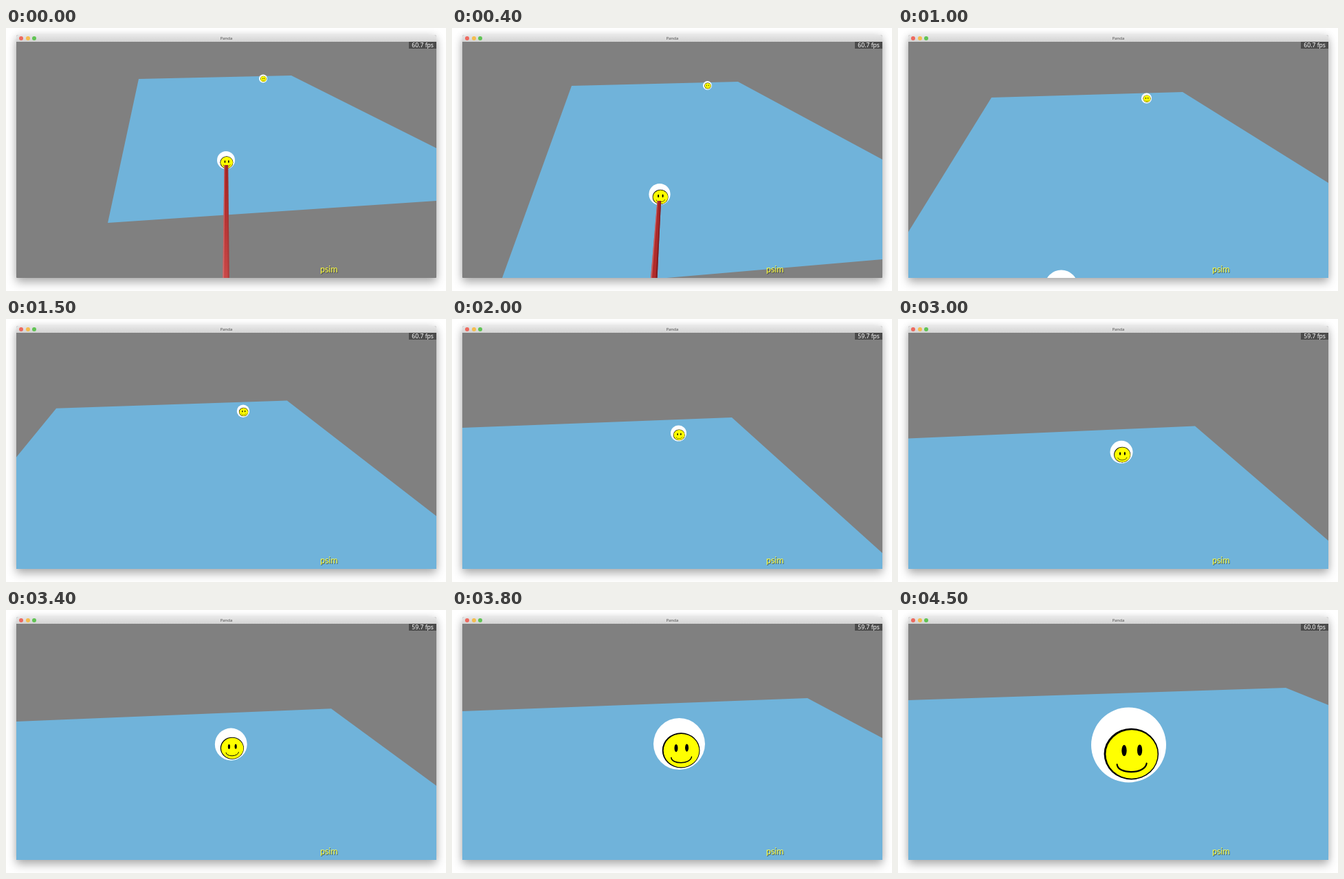
An HTML page with a canvas that plays this animation: 640 px wide and 382 px high, repeating every 4.6 s.

```html
<!DOCTYPE html>
<html lang="en">
<head>
<meta charset="utf-8">
<title>Panda</title>
<style>
  html, body { margin: 0; width: 100%; height: 100%; overflow: hidden; background: #fff; }
  #stage { position: relative; width: 640px; height: 382px; overflow: hidden; }
  #stage > * { position: absolute; }
  #win {
    left: 15px; top: 10px; width: 611px; height: 353px; background: #808080;
    border-radius: 3px 3px 1px 1px;
    box-shadow: 0 0 12px rgba(0,0,0,.12), 0 7px 14px rgba(0,0,0,.28);
  }
  #bar {
    left: 15px; top: 10px; width: 611px; height: 10px; border-radius: 3px 3px 0 0;
    background: linear-gradient(#e8e8e8, #d3d3d3);
    font: 6px/11px "Open Sans", sans-serif; color: #444; text-align: center;
  }
  .dot { top: 12px; width: 6px; height: 6px; border-radius: 50%; }
  #view { left: 0; top: 0; }
  #fps {
    right: 14px; top: 20px; height: 10px; padding: 0 4px; background: #4b4b4b;
    font: 8.6px/10px "Noto Sans", sans-serif; color: #fff; white-space: pre;
  }
  #label {
    left: 457px; top: 342px; font: 12.4px/18px Lato, sans-serif; color: #ffff40;
    text-shadow: .7px .7px 0 rgba(40,50,40,.75);
  }
</style>
</head>
<body>
<div id="stage">
  <div id="win"></div>
  <canvas id="view" width="640" height="382"></canvas>
  <div id="bar">Panda</div>
  <div class="dot" style="left:19px;background:#ee6a5f"></div>
  <div class="dot" style="left:28.5px;background:#f5bd4f"></div>
  <div class="dot" style="left:38px;background:#61c454"></div>
  <div id="fps"></div>
  <div id="label">psim</div>
</div>
<script>
const LOOP = 4600, STEP = 100;
const LEFT = 15, RIGHT = 626, TOP = 20, BOTTOM = 363;
const ctx = document.getElementById('view').getContext('2d');
const fps = document.getElementById('fps');

const allTimes = [0, 400, 1000, 2000, 3000, 3800, 4500];
const earlyTimes = [0, 400, 1000, 1400];

// Smooth curve through (times, values), with parabolic tangents.
function curve(values, times = allTimes) {
  const n = values.length, d = [], m = [];
  const h = i => times[i + 1] - times[i];
  for (let i = 0; i < n - 1; i++) d[i] = (values[i + 1] - values[i]) / h(i);
  for (let i = 1; i < n - 1; i++) m[i] = (d[i - 1] * h(i) + d[i] * h(i - 1)) / (h(i - 1) + h(i));
  m[0] = 2 * d[0] - m[1];
  m[n - 1] = 2 * d[n - 2] - m[n - 2];
  return t => {
    let i = 0;
    while (i < n - 2 && t > times[i + 1]) i++;
    const u = (t - times[i]) / h(i), v = 1 - u;
    return values[i] * (1 + 2 * u) * v * v + values[i + 1] * u * u * (3 - 2 * u)
      + h(i) * (m[i] * u * v * v - m[i + 1] * u * u * v);
  };
}

// Apparent size follows the inverse of distance.
function sizeCurve(radii, times) {
  const inverse = curve(radii.map(r => 1 / r), times);
  return t => 1 / inverse(t);
}

const table = {
  x: curve([415, 416, 414, 407, 432, 517, 564]),
  y: curve([69, 78, 93, 143, 155.5, 128, 113]),
  slope: curve([-.0225, -.0248, -.0288, -.0383, -.0432, -.0378, -.0328]),
  rightY: curve([174.5, 191, 225, 340, 322, 186, 138]),
  farX: curve([193, 174, 136, -18], [0, 400, 1000, 2000]),
  lean: curve([.215, .362, .62, 1], [0, 400, 1000, 2000]),
  nearY: curve([251, 336, 640, 1000], earlyTimes),
  nearSlope: curve([-.067, -.086, -.11, -.12], earlyTimes)
};

const farBall = {
  x: curve([374, 371.5, 361.5, 329.5, 325, 330.5, 335.5]),
  y: curve([73.5, 83.5, 102, 166, 193.3, 194.5, 196]),
  r: sizeCurve([6, 6.5, 7.6, 11.5, 16.5, 37.5, 54.5]),
  drop: curve([.06, .08, .08, .21, .23, .25, .24])
};

const nearBall = {
  x: curve([320, 302, 237.5, 160], earlyTimes),
  y: curve([192, 241.5, 375.5, 520], earlyTimes),
  r: sizeCurve([13, 15.6, 24, 34], earlyTimes),
  drop: () => .25
};

const stick = {
  tipX: curve([320.3, 301.3, 237, 160], earlyTimes),
  tipDrop: curve([7, 9.5, 14, 18], earlyTimes),
  footX: curve([320, 293.8, 232, 150], earlyTimes)
};

function fillPath(points, fill) {
  ctx.beginPath();
  points.forEach(([x, y]) => ctx.lineTo(x, y));
  ctx.closePath();
  ctx.fillStyle = fill;
  ctx.fill();
}

function ellipse(x, y, rx, ry, fill) {
  ctx.beginPath();
  ctx.ellipse(x, y, rx, ry, 0, 0, Math.PI * 2);
  ctx.fillStyle = fill;
  ctx.fill();
}

function drawTable(t) {
  const x = table.x(t), y = table.y(t), slope = table.slope(t);
  const early = t < 2000;
  const farX = early ? table.farX(t) : -200;
  const farY = y + slope * (farX - x);
  const near = t <= 1000 ? table.nearY(t) : 1000;
  let corner = [farX, 1000];
  if (early) {
    // Where the left cushion meets the near one.
    const lean = table.lean(t), k = t <= 1000 ? table.nearSlope(t) : 0;
    const cy = (near + k * (farX + lean * farY - RIGHT)) / (1 + k * lean);
    corner = [farX - lean * (cy - farY), cy];
  }
  fillPath([[farX, farY], [x, y], [RIGHT, table.rightY(t)], [RIGHT, near], corner], '#70b3da');
}

// Face in units of the ball radius.
function drawBall(ball, t) {
  const r = ball.r(t);
  ctx.save();
  ctx.translate(ball.x(t), ball.y(t));
  ctx.scale(r, r);
  ellipse(0, 0, 1, 1, '#fff');
  ctx.translate(.07, ball.drop(t));
  ellipse(0, 0, .73, .685, '#000');
  ellipse(.012, .008, .69, .645, '#ff0');
  ellipse(-.19, -.09, .067, .15, '#000');
  ellipse(.225, -.1, .067, .15, '#000');
  ctx.beginPath();
  ctx.moveTo(-.38, .28);
  ctx.bezierCurveTo(-.36, .55, .36, .55, .41, .25);
  ctx.lineWidth = .04;
  ctx.lineCap = 'round';
  ctx.strokeStyle = '#000';
  ctx.stroke();
  ctx.restore();
}

function drawStick(t) {
  const x = stick.tipX(t), y = nearBall.y(t) + stick.tipDrop(t);
  if (y >= BOTTOM) return;
  const foot = stick.footX(t), tilt = Math.min(1, t / 400);
  // Part of the width, from a to b in -1..1.
  const strip = (a, b, fill) => fillPath(
    [[x + 2.8 * a, y], [x + 2.8 * b, y], [foot + 4.8 * b, BOTTOM], [foot + 4.8 * a, BOTTOM]], fill);
  const shade = ctx.createLinearGradient(0, y, 0, BOTTOM);
  shade.addColorStop(0, '#a52424');
  shade.addColorStop(.24, '#ae2a2a');
  shade.addColorStop(1, tilt < 1 ? '#c94848' : '#b02b2b');
  strip(-1, 1, shade);
  strip(-1, -.6, 'rgba(214,130,130,.6)');
  strip(.55, 1, tilt < 1 ? 'rgba(150,55,55,.55)' : 'rgba(120,25,30,.8)');
}

function draw(t) {
  ctx.clearRect(0, 0, 640, 382);
  ctx.save();
  ctx.beginPath();
  ctx.rect(LEFT, TOP, RIGHT - LEFT, BOTTOM - TOP);
  ctx.clip();
  drawTable(t);
  drawBall(farBall, t);
  if (t < 1400) {
    drawBall(nearBall, t);
    drawStick(t);
  }
  ctx.restore();
  fps.textContent = (t < 1700 ? '60.7' : t < 4200 ? '59.7' : '60.0') + ' fps';
}

const start = performance.now();
function tick() {
  const t = (performance.now() - start) % LOOP;
  draw(Math.floor(t / STEP) * STEP);
  requestAnimationFrame(tick);
}
tick();
</script>
</body>
</html>
```
